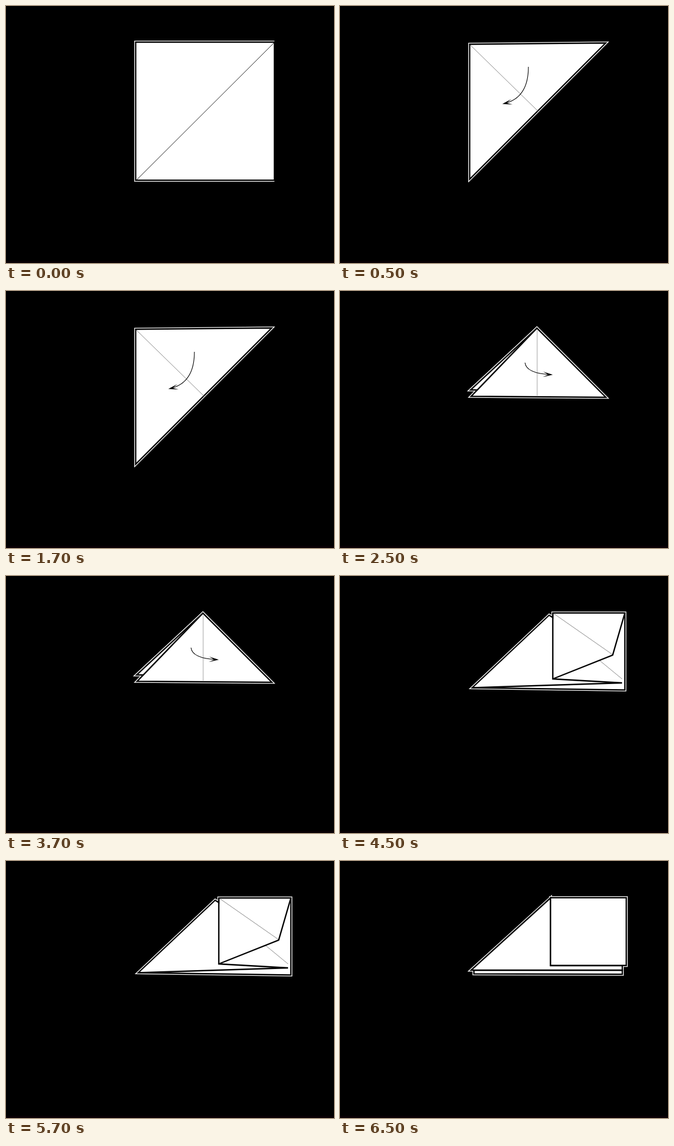
Recreate the animation shown at these times as an HTML page with a canvas. Size 578x452 px, loop 8 s.

```html
<!DOCTYPE html>
<html lang="en">
<head>
<meta charset="utf-8">
<title>Paper folding</title>
<style>
html, body { margin: 0; width: 100%; height: 100%; overflow: hidden; background: #000; }
canvas { display: block; }
</style>
</head>
<body>
<canvas id="stage" width="578" height="452"></canvas>
<script>
const ctx = document.getElementById('stage').getContext('2d');
const LOOP = 8000;
const INK = 2.4;  // black edge of the paper
const RIM = 1.3;  // white hairline outside the edge

const box = (l, t, r, b) => [[r, t], [l, t], [l, b], [r, b]];

function stroke(path, color, width) {
  ctx.strokeStyle = color;
  ctx.lineWidth = width;
  ctx.stroke(path);
}

function trace(points, closed) {
  const path = new Path2D();
  for (const [x, y] of points) path.lineTo(x, y);
  if (closed) path.closePath();
  return path;
}

const line = (points, color = '#000', width = INK) => stroke(trace(points), color, width);
const crease = (from, to, color = '#888', width = 1) => line([from, to], color, width);

// Stacked sheets share one outer rim, so every rim lies below every face.
function paper(sheets, closedRim = true) {
  for (const s of sheets) stroke(trace(s, closedRim), '#fff', INK + 2 * RIM);
  for (const s of sheets) {
    const path = trace(s, true);
    ctx.fillStyle = '#fff';
    ctx.fill(path);
    stroke(path, '#000', INK);
  }
}

function arrow([x, y], [cx, cy], [ex, ey]) {
  const back = Math.atan2(cy - ey, cx - ex);
  const at = (r, turn) => [ex + r * Math.cos(back + turn), ey + r * Math.sin(back + turn)];
  const shaft = new Path2D();
  shaft.moveTo(x, y);
  shaft.quadraticCurveTo(cx, cy, ...at(3, 0));
  stroke(shaft, '#000', 1.1);
  ctx.fillStyle = '#000';
  ctx.fill(trace([[ex, ey], at(18, 0.27), at(8, 0), at(18, -0.27)], true));
}

function square() {
  paper([box(228.5, 63.5, 473, 306.5)], false);
  crease([230, 306], [472, 65], '#222');
}

function triangle() {
  paper([[[228.5, 67.2], [468.2, 65], [228.5, 304.5]]]);
  crease([230, 69], [349, 185]);
  arrow([332, 107], [332, 162], [286, 172.3]);
}

function halved() {
  const top = [347, 65.3];
  paper([
    [top, [230, 174], [250, 174]],
    [top, [468.5, 187], [231, 185.3]]
  ]);
  crease([347.5, 68], [347.5, 184], '#ccc', 2);
  arrow([326, 126], [328, 145], [375, 147.3]);
}

function opened() {
  const left = [233, 196.5], top = [375, 65], right = [502, 65], mid = [375, 181];
  paper([[[368.5, 69], left, [502, 200.5], right, top, [375, 73]]]);
  crease(top, [480, 138]);
  crease([458, 149], [497, 181]);
  line([top, mid, [497, 188], left]);
  line([mid, [480.5, 139], right]);
}

function flattened() {
  const top = [371, 65], right = 497.5, base = 192;
  paper([
    [[236, base], [right, base], [right, 199.3], [236, 198.5]],
    [top, [231, base], [right, base], [right, 184], [371, 184]],
    box(371, 64.5, 504.5, 183.7)
  ]);
}

const steps = [square, triangle, halved, opened, flattened];

// The first pose lasts 500 ms, each later one 2000 ms until the loop ends.
function render(now) {
  const t = Math.max(0, now) % LOOP;
  ctx.fillStyle = '#000';
  ctx.fillRect(0, 0, 578, 452);
  ctx.fillStyle = '#080004';
  ctx.fillRect(0, 448, 578, 4);
  steps[Math.floor((t + 1500) / 2000)]();
}

const begin = performance.now();
function tick() {
  render(performance.now() - begin);
  requestAnimationFrame(tick);
}
tick();
</script>
</body>
</html>
```
